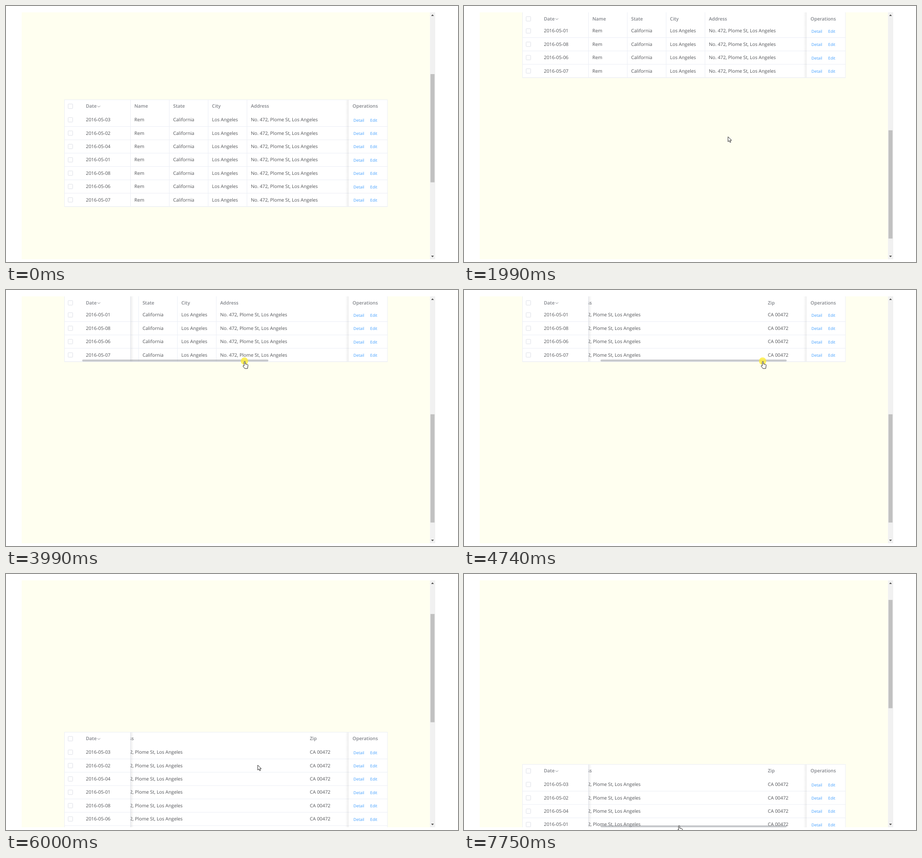
Animation, 993 px wide and 564 px high, one loop 8 s. Source, as an HTML page:

```html
<!DOCTYPE html>
<html lang="en">
<head>
<meta charset="utf-8">
<title>Table with sticky header</title>
<style>
  html, body { margin: 0; width: 100%; height: 100%; overflow: hidden; background: #fff; }
  svg { display: block; width: 100%; height: 100%; }
  text { font: 10.35px "Open Sans", "Noto Sans", sans-serif; fill: #505256; text-rendering: geometricPrecision; }
  .head text { font-weight: 600; fill: #7f8288; }
  text.link { font-size: 8.8px; fill: #409eff; }
  .line { stroke: #ebeef5; fill: none; }
  .box { fill: #fff; stroke: #dcdfe6; }
  .cursor { fill: #fff; stroke: #222; stroke-linejoin: round; }
</style>
</head>
<body>
<svg id="stage" viewBox="0 0 993 564"></svg>
<script>
const LOOP = 8000, STEP = 250;
const ROW = 29.4, HEIGHT = ROW * 8, COL = 85.3, PAD = 8.5;
const LEFT = 128.5, RIGHT = 838, TOP = 14, BOTTOM = 558;
const FIXED_L = 273.5, FIXED_R = RIGHT - COL;
const START = 206.6, NOTCH = 71, SLIDE = 297, BAR_RATIO = 0.577, THUMB_RATIO = 0.436;

const days = ['03', '02', '04', '01', '08', '06', '07'];
// slot = offset in column widths
const columns = [
  { slot: 0, title: 'Name', value: 'Rem' },
  { slot: 1, title: 'State', value: 'California' },
  { slot: 2, title: 'City', value: 'Los Angeles' },
  { slot: 3, title: 'Address', value: 'No. 472, Plome St, Los Angeles' },
  { slot: 8, title: 'Zip', value: 'CA 00472' }
];

// Pointer moves: from time, to time, x, y
const moves = [
  [0, 250, 760, 420], [250, 750, 580, 288], [2000, 2500, 482, 168], [2500, 3000, 484, 156],
  [3750, 4560, 655, 156], [4750, 5250, 606, 224], [5250, 6000, 553, 421], [6000, 6750, 471, 553]
];

const text = (x, y, s, cls = '') => `<text x="${x}" y="${y}" class="${cls}">${s}</text>`;
const rect = (x, y, w, h, attrs = '') => `<rect x="${x}" y="${y}" width="${w}" height="${h}" ${attrs}/>`;
const tableRect = (h, attrs) => rect(LEFT, 0, RIGHT - LEFT, h, attrs);
const viewRect = attrs => rect(34.5, TOP, 897, BOTTOM - TOP, attrs);
const line = (x1, y1, x2, y2) => `<path class="line" d="M${x1} ${y1}L${x2} ${y2}"/>`;
const mid = inner => `<g clip-path="url(#middle)"><g class="slide">${inner}</g></g>`;
const checkbox = y => rect(136.5, y - 5, 10, 10, 'rx="1" class="box"');
const cells = (key, y) => mid(columns.map(c => text(FIXED_L + PAD + c.slot * COL, y, c[key])).join(''));
const fade = (id, a, b) =>
  `<linearGradient id="${id}"><stop stop-opacity="${a}"/><stop offset="1" stop-opacity="${b}"/></linearGradient>`;

function bodyRow(day, i) {
  const y = ROW * (i + 1), base = y + 18.3;
  return checkbox(y + 14.7) + text(175.5, base, '2016-05-' + day) + cells('value', base) +
    text(763.3, base + 0.4, 'Detail', 'link') + text(800, base + 0.4, 'Edit', 'link') +
    line(LEFT, y + ROW, RIGHT, y + ROW);
}

function header() {
  return tableRect(ROW - 1, 'fill="#fff"') + checkbox(14.3) + text(175.5, 17.8, 'Date') +
    '<path d="M201 13.2l3 3 3-3" fill="none" stroke="#85888e"/>' +
    cells('title', 17.8) + text(761.3, 17.8, 'Operations');
}

function frame() {
  const dividers = [1, 2, 3].map(n => FIXED_L + n * COL).map(x => line(x, 0, x, HEIGHT));
  return mid(dividers.join('')) + line(FIXED_L, 0, FIXED_L, HEIGHT) +
    rect(FIXED_L, 0, 7, HEIGHT, 'id="shade" fill="url(#fadeL)"') +
    rect(FIXED_R - 7, 0, 7, HEIGHT, 'fill="url(#fadeR)"') +
    tableRect(HEIGHT, 'class="line"');
}

document.getElementById('stage').innerHTML = `
  <defs>
    <clipPath id="view">${viewRect()}</clipPath>
    <clipPath id="middle">${rect(FIXED_L, 0, FIXED_R - FIXED_L, HEIGHT)}</clipPath>
    ${fade('fadeL', 0.07, 0)}${fade('fadeR', 0, 0.07)}
  </defs>
  ${viewRect('fill="#fffff0"')}
  <g clip-path="url(#view)">
    <g id="body">
      ${tableRect(HEIGHT, 'fill="#fff"')}
      <g id="hover">${tableRect(ROW, 'fill="#f5f7fa"')}</g>
      ${days.map(bodyRow).join('')}
    </g>
    <g id="head" class="head">${header()}</g>
    <g id="frame">${frame()}</g>
    ${rect(LEFT, 0, 409, 4.2, 'id="bar" rx="2" fill="#909399"')}
  </g>
  ${rect(931.5, TOP, 11.5, BOTTOM - TOP, 'fill="#f1f1f1"')}
  ${rect(932.5, 150, 9, 238.5, 'id="thumb" fill="#c1c1c1"')}
  <path d="M934 22h6l-3-3.4zM934 550h6l-3 3.4z" fill="#505050"/>
  <g id="pointer">
    <circle id="press" cx="1" cy="0.5" r="8" fill="#fdec3c" opacity="0.8"/>
    <path id="arrow" class="cursor" d="M0 0V11L2.6 8.7 4.4 12.6 6.2 11.8 4.5 8H8z"/>
    <path id="hand" class="cursor" d="M.3 11.2V2.7a1.3 1.3 0 0 1 2.6 0V7L7.4 7.9Q9 8.3 8.8 10.2L7.8 17H1.8L-2 12.3Q-2.3 10.2-.7 10.5z"/>
  </g>`;

const el = id => document.getElementById(id);
const slides = document.querySelectorAll('.slide');
const place = (node, x, y) => node.setAttribute('transform', `translate(${x} ${y})`);
const show = (id, on) => el(id).setAttribute('visibility', on ? 'visible' : 'hidden');

// Smooth 0..1 ramp between two times
function ramp(t, from, to) {
  const p = Math.min(1, Math.max(0, (t - from) / (to - from)));
  return p * p * (3 - 2 * p);
}

function pointerAt(t) {
  return moves.reduce(([px, py], [from, to, x, y]) => {
    const p = ramp(t, from, to);
    return [px + (x - px) * p, py + (y - py) * p];
  }, [760, 420]);
}

function draw(ms) {
  const t = Math.floor((ms + 10) / STEP) * STEP % LOOP;
  const within = (from, to) => t >= from && t < to;

  // Wheel runs: four notches down, six up, one more up
  const notches = -4 * ramp(t, 750, 1866) + 6 * ramp(t, 4750, 5650) + ramp(t, 7150, 7475);
  const top = START + NOTCH * notches;
  const slide = SLIDE * ramp(t, 3750, 4560);

  const hovering = within(250, 2000) || within(5000, 5750);
  const pressed = within(3500, 5000), onBar = within(3000, 5000) || t >= 6750;
  const barShown = hovering || within(2750, 5000) || t >= 6250;

  place(el('body'), 0, top);
  place(el('frame'), 0, top);
  place(el('head'), 0, Math.max(top, TOP));
  slides.forEach(g => place(g, -slide, 0));
  show('shade', slide > 0);

  place(el('hover'), 0, ROW * 2);
  show('hover', hovering);
  place(el('bar'), slide * BAR_RATIO, Math.min(top + HEIGHT - 4.6, BOTTOM - 4.2));
  el('bar').setAttribute('opacity', !barShown ? 0 : onBar ? 0.5 : 0.3);
  place(el('thumb'), 0, (START - top) * THUMB_RATIO);

  place(el('pointer'), ...pointerAt(t));
  show('arrow', t > 0 && !onBar);
  show('hand', onBar);
  show('press', pressed);
}

function tick(now) {
  draw(now % LOOP);
  requestAnimationFrame(tick);
}
draw(0);
requestAnimationFrame(tick);
</script>
</body>
</html>
```
